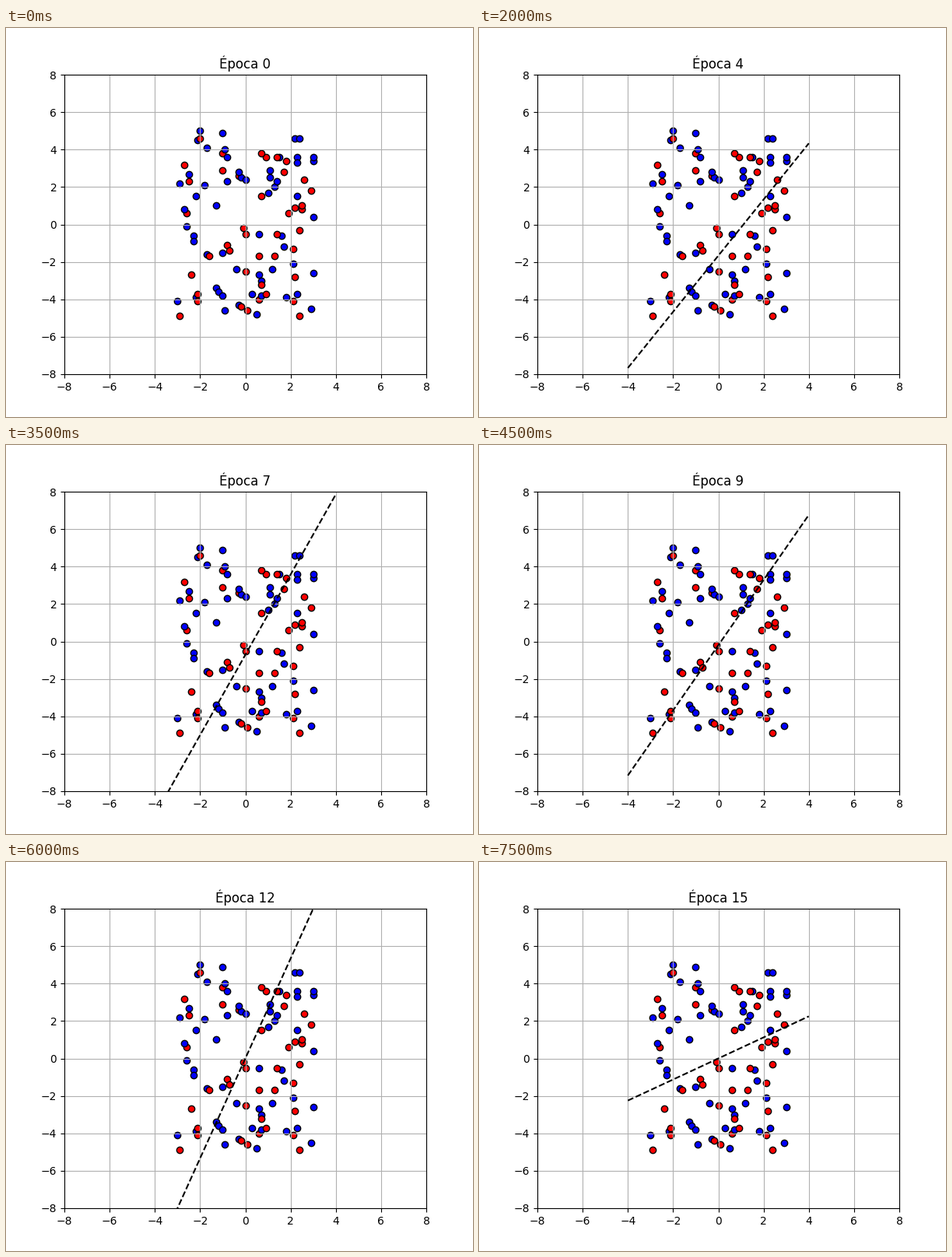
Write a matplotlib script that moves like this. It is 600x500 px and loops after 8 s.

```python
import numpy as np
import matplotlib.pyplot as plt
from matplotlib.animation import FuncAnimation

EPOCHS = 16
INTERVAL = 500

RED_BACK = [(-2.6, .6), (-.3, 2.6), (.6, -4), (-1, 3.8)]

BLUE = [
    (-2, 5), (-2.1, 4.5), (-1, 4.9), (-1.7, 4.1), (-.9, 4), (-.8, 3.6),
    (-.8, 2.3), (-.2, 2.5), (-.3, 2.8), (0, 2.4), (-2.5, 2.7), (-2.9, 2.2),
    (-1.8, 2.1), (-2.2, 1.5), (-1.3, 1), (-2.7, .8), (-2.6, -.1),
    (-2.3, -.6), (-2.3, -.9), (-1.7, -1.6), (-1, -1.5), (-.4, -2.4),
    (-1.3, -3.4), (-1.2, -3.6), (-1, -3.8), (-.9, -4.6), (-.3, -4.3),
    (-3, -4.1), (-2.2, -3.9), (.3, -3.7), (.5, -4.8), (.6, -2.7), (.7, -3),
    (.7, -3.8), (1.2, -2.4), (.6, -.5), (1.6, -.6), (1.7, -1.2),
    (2.1, -2.1), (3, -2.6), (2.3, -3.7), (1.8, -3.9), (2.9, -4.5), (3, .4),
    (2.3, 1.5), (1, 1.7), (1.3, 2), (1.4, 2.3), (1.1, 2.5), (1.1, 2.9),
    (1.5, 3.6), (2.3, 3.6), (2.3, 3.3), (3, 3.4), (3, 3.6), (2.2, 4.6),
    (2.4, 4.6),
]

RED = [
    (-2, 4.6), (-2.7, 3.2), (-2.5, 2.3), (-1, 2.9), (-.1, -.2), (0, -.5),
    (-.8, -1.1), (-.7, -1.4), (-1.6, -1.7), (-2.4, -2.7), (-2.1, -3.7),
    (-2.1, -4.1), (-2.9, -4.9), (0, -2.5), (-.2, -4.4), (.1, -4.6),
    (.9, -3.7), (.7, -3.2), (.6, -1.7), (1.3, -1.7), (1.4, -.5),
    (2.1, -1.3), (2.2, -2.8), (2.1, -4.1), (2.4, -4.9), (2.4, -.3),
    (1.9, .6), (2.2, .9), (2.5, .8), (2.5, 1), (2.9, 1.8), (2.6, 2.4),
    (.7, 1.5), (1.7, 2.8), (1.8, 3.4), (1.4, 3.6), (.9, 3.6), (.7, 3.8),
]

# Slope and intercept of the decision boundary, from epoch 1 on
BOUNDARY = [
    (1, -2), (2, -2.5), (1.3, -2.1), (1.5, -5 / 3), (1.4, -1.3),
    (2.2, -.9), (15 / 7, -5 / 7), (1.4, -.5), (1.74, -.2), (1.5, 0),
    (1.1, 0), (8 / 3, 0), (3, 0), (4, 0), (9 / 16, 0),
]

fig, ax = plt.subplots(figsize=(6, 5), dpi=100)
ax.set(xlim=(-8, 8), ylim=(-8, 8))
ax.grid(True)

for points, color in ((RED_BACK, "red"), (BLUE, "blue"), (RED, "red")):
    ax.scatter(*np.transpose(points), c=color, edgecolors="black")

line, = ax.plot([], [], "k--")
title = ax.set_title("Época 0")
xs = np.array([-4, 4])


def update(epoch):
    title.set_text(f"Época {epoch}")
    if epoch == 0:
        line.set_data([], [])
    else:
        slope, intercept = BOUNDARY[epoch - 1]
        line.set_data(xs, slope * xs + intercept)
    return line, title


anim = FuncAnimation(fig, update, frames=EPOCHS, interval=INTERVAL,
                     repeat=True, repeat_delay=0)
plt.show()
```
